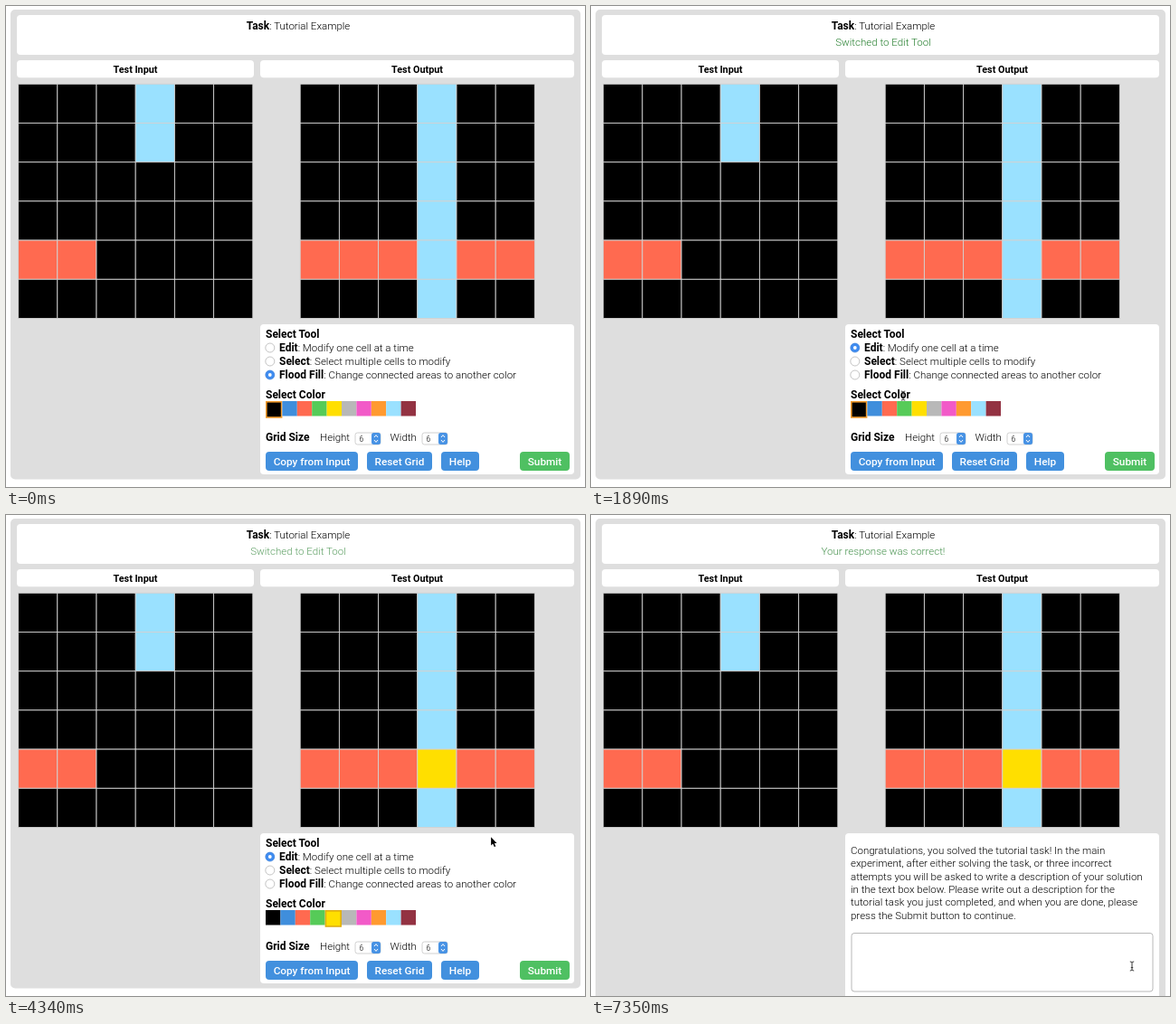
Animation of 640 by 532 pixels, one loop 7.42 s. Source, as an HTML page:

```html
<!DOCTYPE html>
<html lang="en">
<head>
<meta charset="utf-8">
<title>Grid editor tutorial</title>
<style>
  html, body { margin: 0; width: 100%; height: 100%; overflow: hidden; background: #fff; }
  svg { display: block; width: 100%; height: 100%; }
  text { font: 300 11.5px Roboto, "Liberation Sans", sans-serif; fill: #000; white-space: pre; }
  .bold { font-weight: 700; font-size: 12px; }
  .head { font-weight: 700; font-size: 10.8px; }
  .mid { text-anchor: middle; }
  .btn { font-weight: 500; font-size: 11.8px; fill: #fff; text-anchor: middle; }
  .tiny { font-size: 8.5px; }
</style>
</head>
<body>
<svg id="stage" viewBox="0 0 640 532"></svg>
<script>
const LOOP = 7420;
const PICK_TOOL = 1330, PICK_COLOR = 2620, PAINT = 3560, PRESS = 4960, DONE = 5250;
const COLORS = ["#000", "#3f8edc", "#ff6a50", "#56cb58", "#ffdf00",
  "#b8b8b8", "#f25ac8", "#ff9a30", "#9ae1ff", "#933242"];
const RED = 2, YELLOW = 4, SKY = 8;
const CELL = 43.2;

// Pointer stops: time, x, y
const PATH = [
  [70, 420, 250], [900, 311, 376], [1450, 311, 376], [1890, 345, 431],
  [2350, 361, 446], [2850, 361, 446], [3400, 476, 281], [3850, 476, 281],
  [4340, 536, 356], [4850, 598, 499], [LOOP, 598, 499]
];
// Pressed intervals
const CLICKS = [[1210, PICK_TOOL], [2500, PICK_COLOR], [3440, PAINT], [PRESS, DONE]];

const rect = (x, y, w, h, fill, r = 0, extra = "") =>
  `<rect x="${x}" y="${y}" width="${w}" height="${h}" rx="${r}" fill="${fill}" ${extra}/>`;
const text = (x, y, s, cls = "") => `<text x="${x}" y="${y}" class="${cls}">${s}</text>`;
const bold = s => `<tspan class="bold">${s}</tspan>`;

function grid(x0, id, colorAt) {
  let out = "";
  for (let r = 0; r < 6; r++)
    for (let c = 0; c < 6; c++)
      out += rect(x0 + c * CELL, 86.3 + r * CELL, CELL, CELL, COLORS[colorAt(r, c)], 0,
        `id="${id}${r}${c}" stroke="#d2d2d2" stroke-width=".9"`);
  return out;
}

const radio = (id, y, name, note) =>
  `<circle id="${id}" cx="291.8" cy="${y}" r="5"/>` +
  `<circle cx="291.8" cy="${y}" r="1.9" fill="#fff"/>` +
  text(302, y + 4, bold(name) + ": " + note);

const stepper = x =>
  rect(x, 472, 28, 13, "#fff", 2.5, 'stroke="#c4c4c4" stroke-width=".8"') +
  rect(x + 18, 472, 10, 13, "#4792e4", 2.5) +
  `<path d="M${x + 21} 477l2-2.4 2 2.4m-4 3l2 2.4 2-2.4" fill="none" stroke="#fff"/>` +
  text(x + 4.5, 481.7, "6", "tiny");

const button = (x, w, label, fill, id = "") =>
  rect(x, 493, w, 21, fill, 4, id && `id="${id}"`) + text(x + w / 2, 507.7, label, "btn");

const LINES = [
  "Congratulations, you solved the tutorial task! In the main",
  "experiment, after either solving the task, or three incorrect",
  "attempts you will be asked to write a description of your solution",
  "in the text box below. Please write out a description for the",
  "tutorial task you just completed, and when you are done, please",
  "press the Submit button to continue."
];

const BLUE = "#4290de", GREEN = "#4fc062";
const stage = document.getElementById("stage");
stage.innerHTML =
  rect(5, 4, 630, 519.5, "#dedede", 5, 'id="page"') +
  rect(12, 10, 616, 44, "#fff", 4) +
  text(323, 26, bold("Task") + ": Tutorial Example", "mid") +
  `<text id="message" x="323" y="44.3" class="mid"></text>` +
  rect(12, 60, 262, 19.3, "#fff", 4) + text(143, 74, "Test Input", "head mid") +
  rect(281, 60, 347, 19.3, "#fff", 4) + text(454.5, 74, "Test Output", "head mid") +
  grid(13.6, "in", (r, c) => c === 3 && r < 2 ? SKY : r === 4 && c < 2 ? RED : 0) +
  grid(325.2, "out", (r, c) => c === 3 ? SKY : r === 4 ? RED : 0) +
  `<g id="tools">` +
  rect(281, 352, 347, 166, "#fff", 4) +
  text(287, 367, "Select Tool", "bold") +
  radio("edit", 378, "Edit", "Modify one cell at a time") +
  radio("select", 393, "Select", "Select multiple cells to modify") +
  radio("fill", 408, "Flood Fill", "Change connected areas to another color") +
  text(287, 434, "Select Color", "bold") +
  `<g id="swatches"></g>` +
  text(287, 481.3, "Grid Size", "bold") +
  text(347, 481.3, "Height") + stepper(386) +
  text(424.5, 481.3, "Width") + stepper(460) +
  button(287, 102, "Copy from Input", BLUE) +
  button(399, 72, "Reset Grid", BLUE) +
  button(481, 42, "Help", BLUE) +
  button(568, 55, "Submit", GREEN, "submit") +
  `</g><g id="thanks">` +
  rect(281, 352, 347, 190, "#fff", 4) +
  LINES.map((s, i) => text(287, 374.8 + i * 14.4, s)).join("") +
  rect(288, 462.5, 333, 64.5, "#fff", 3, 'stroke="#b8b8b8"') +
  `</g><g id="pointer">` +
  `<path id="arrow" d="M0 0V9.3L2.1 7.4 3.6 10.9 5.2 10.2 3.7 6.8H6.4Z" fill="#000" stroke="#fff" stroke-width=".7" paint-order="stroke"/>` +
  `<path id="beam" d="M-2.2-5Q0-5 0-3.8Q0-5 2.2-5M0-3.8V3.8M-2.2 5Q0 5 0 3.8Q0 5 2.2 5M-1.2 1.6H1.2" fill="none" stroke="#222" stroke-width=".9"/>` +
  `<circle id="ring" r="13" fill="none" stroke="#000" stroke-width="1.8"/></g>`;

const $ = id => document.getElementById(id);
const show = (id, on) => $(id).setAttribute("visibility", on ? "inherit" : "hidden");
const set = (id, attrs) => {
  for (const k in attrs) $(id).setAttribute(k, attrs[k]);
};

function swatches(chosen) {
  let x = 287;
  return COLORS.map((color, i) => {
    const on = i === chosen;
    const w = on ? 18.4 : 16.4;
    const edge = chosen === YELLOW ? "#dfae12" : "#f09a2c";
    const s = on
      ? rect(x + .8, 437.8, w - 1.6, 17.2, color, 0, `stroke="${edge}" stroke-width="1.6"`)
      : rect(x, 437, w, 16.5, color);
    x += w;
    return s;
  }).join("");
}

// Speed is zero where the pointer rests, continuous elsewhere
function slope(i, k) {
  const a = PATH[i - 1], b = PATH[i], c = PATH[i + 1];
  if (!a || !c || a[k] === b[k] || b[k] === c[k]) return 0;
  return (c[k] - a[k]) / (c[0] - a[0]);
}

function pointerAt(t) {
  let i = 0;
  while (i < PATH.length - 2 && t >= PATH[i + 1][0]) i++;
  const a = PATH[i], b = PATH[i + 1], d = b[0] - a[0];
  const p = Math.max(0, (t - a[0]) / d), p2 = p * p, p3 = p2 * p;
  return [1, 2].map(k =>
    a[k] * (2 * p3 - 3 * p2 + 1) + b[k] * (3 * p2 - 2 * p3) +
    slope(i, k) * d * (p3 - 2 * p2 + p) + slope(i + 1, k) * d * (p3 - p2));
}

function setRadio(id, on) {
  set(id, on
    ? { fill: "#3f8cf0", stroke: "#2f78d6", "stroke-width": .6 }
    : { fill: "#fff", stroke: "#b5b5b5", "stroke-width": .8 });
}

function draw(t) {
  const done = t >= DONE, editing = t >= PICK_TOOL, pressed = t >= PRESS && !done;
  set("page", { height: done ? 540 : 519.5 });
  show("tools", !done);
  show("thanks", done);

  const since = t - (done ? DONE : PICK_TOOL);
  $("message").textContent = done ? "Your response was correct!" : editing ? "Switched to Edit Tool" : "";
  $("message").style.fill = "#16751f";
  set("message", { opacity: 1 - .4 * Math.min(1, since / 4000) });

  setRadio("edit", editing);
  setRadio("select", false);
  setRadio("fill", !editing);
  $("swatches").innerHTML = swatches(t >= PICK_COLOR ? YELLOW : 0);
  set("out43", { fill: COLORS[t >= PAINT ? YELLOW : SKY] });
  set("submit", {
    fill: pressed ? "#1d741f" : GREEN,
    stroke: pressed ? "#8cc9e8" : "none",
    "stroke-width": 2
  });

  const [x, y] = pointerAt(t);
  const overTitle = x > 287 && x < 358 && (y > 357 && y < 369 || y > 424 && y < 437);
  const beam = done || overTitle;
  set("pointer", { transform: `translate(${x} ${y})` });
  show("pointer", t >= 70);
  show("arrow", !beam);
  show("beam", beam);
  show("ring", CLICKS.some(([from, to]) => t >= from && t < to));
}

const start = performance.now();
function tick() {
  draw((performance.now() - start) % LOOP);
  requestAnimationFrame(tick);
}
draw(0);
requestAnimationFrame(tick);
</script>
</body>
</html>
```
